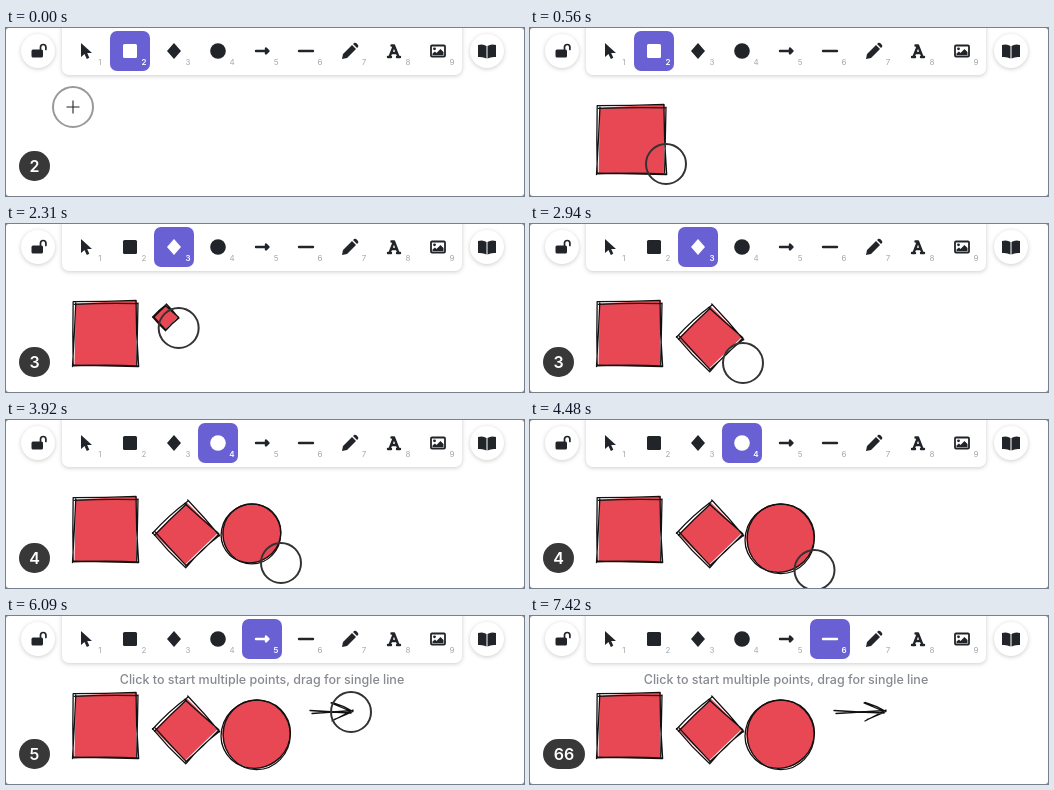
These frames come from a looping animation (518x168 px, 8 s). An HTML page:

```html
<!DOCTYPE html>
<html lang="en">
<head>
<meta charset="utf-8">
<title>Sketching shapes with number keys</title>
<style>
html, body { margin: 0; width: 100%; height: 100%; overflow: hidden; background: #888; }
svg { display: block; width: 518px; height: 168px; background: #fff; border-radius: 3px; }
text { font-family: Inter, "Open Sans", sans-serif; text-anchor: middle; }
.panel { fill: #fff; filter: drop-shadow(0 1px 2px #0003); }
.tool rect.key { fill: none; }
.tool { color: #212529; fill: currentColor; }
.tool text { font-size: 8px; fill: #a5a9ae; }
.tool.on { color: #fff; }
.tool.on rect.key { fill: #6960d4; }
.tool.on text { fill: #fff; font-weight: 600; }
.icon { fill: none; stroke: currentColor; stroke-width: 2.4; stroke-linecap: round; stroke-linejoin: round; }
.ink { fill: none; stroke: #111; stroke-width: 1.3; stroke-linecap: round; }
.ink path, .ink ellipse { vector-effect: non-scaling-stroke; }
.ink .paint { fill: #e84754; stroke: none; }
.select { fill: #fff; stroke: #111; stroke-width: 1.1; }
.hint { font-size: 12.5px; font-weight: 500; fill: #868a90; }
.badge text { font-size: 16px; font-weight: 600; fill: #fff; }
</style>
</head>
<body>
<svg viewBox="0 0 518 168">
  <g id="scene"></g>
  <rect class="panel" x="56" y="-10" width="400" height="57" rx="7"/>
  <circle class="panel" cx="32" cy="23" r="17"/>
  <circle class="panel" cx="481" cy="23" r="17"/>
  <g fill="#212529">
    <rect x="25.500" y="21.500" width="11.500" height="8" rx="1.500"/>
    <path d="M34.500 22V19.200a2.700 2.700 0 0 1 5.400 0V21.500" fill="none" stroke="#212529" stroke-width="1.700" stroke-linecap="round"/>
    <path d="M472 17q5-1.500 8.500 1v12.500q-3.500-2-8.500-1.500zM490 17q-5-1.500-8.500 1v12.500q3.500-2 8.500-1.500z"/>
  </g>
  <g id="tools"></g>
  <g id="overlay"></g>
</svg>
<script>
const LOOP = 8000, TICK = 70;
const $ = id => document.getElementById(id);

const icons = [
  '<path d="M-5-8V6l3.500-3 2.300 5 2.500-1.200L1.200 2H6z"/>',
  '<rect x="-7" y="-7" width="14" height="14" rx="1.500"/>',
  '<path d="M0-8 7 0 0 8-7 0z"/>',
  '<circle r="7.800"/>',
  '<path class="icon" d="M-6 0H5M4-2.500 6.500 0 4 2.500z"/>',
  '<path class="icon" d="M-7 0H7"/>',
  '<path d="M-8 8-7 3 2-6 6-2-3 7zM3-7l1.500-1.200q1-.5 2 .5L8-6q.7 1 0 2L7-3z"/>',
  '<path class="icon" d="M-4.500 6 0-5.500 4.500 6M-3 2H3M-6 6h3M3 6h3M-2.500-5.500H0"/>',
  '<rect class="icon" x="-7" y="-5.500" width="14" height="11" rx="1" style="stroke-width:1.800"/><circle cx="-3.500" cy="-2.200" r="1.400"/><path d="M-5.500 4V2.500L-3 .5-1.500 2 2.500-2 5.500 1V4z"/>'
];
$('tools').innerHTML = icons.map((icon, i) => `<g class="tool" transform="translate(${60 + 44 * i} 3)">
  <rect class="key" width="40" height="40" rx="7"/><g transform="translate(20 20)">${icon}</g>
  <text x="34" y="34">${i + 1}</text></g>`).join('');
const buttons = [...$('tools').children];

// [time, tool number]
const toolTimes = [[0, 2], [1050, 1], [1400, 3], [3010, 1], [3220, 4], [4620, 1], [5110, 5], [6790, 1], [7420, 6]];
// [label, pressed at]
const keys = [['2', -2030], ['3', 1400], ['4', 3220], ['5', 5110], ['66', 7420]];

// Hand-drawn shapes on a 100-unit square
const square = `<path class="paint" d="M5 4 98-1 97 98 3 99z"/>
  <path d="M1 1Q50 1 97-1M3 5Q50 3 100 4M97 0Q97 50 101 100M100 3Q99 50 98 97M101 99Q50 97 1 99M2 98 100 100M5 3Q3 50 0 100M1 1Q0 50 1 98"/>`;
const diamond = `<path class="paint" d="M52 4 98 50 49 97 3 52z"/>
  <path d="M53 0Q78 26 101 54M48 5Q72 27 99 50M0 50Q24 23 54 1M3 53Q25 30 51 6M0 49Q23 77 50 102M4 48Q28 75 50 98M50 99Q75 77 100 51M51 101Q72 75 101 53"/>`;
const disc = `<ellipse class="paint" cx="50" cy="50" rx="49" ry="50"/>
  <ellipse cx="51" cy="51" rx="48.500" ry="50.500"/>
  <ellipse cx="49.500" cy="50" rx="51" ry="48.500" transform="rotate(-35 50 50)"/>`;

// path: [time, x, y] of the pointer; the button is held from down to up
const drags = [
  { art: square, x: 66.5, y: 77, down: 70, up: 1050, off: 1400,
    path: [[0, 67, 79], [70, 67, 79], [420, 136, 136], [560, 136, 136], [770, 132, 133], [910, 132, 133]] },
  { art: diamond, x: 146.5, y: 80, down: 2170, up: 3010, off: 3220,
    path: [[2030, 150, 47], [2170, 148, 82], [2590, 222, 148], [2800, 214, 141], [2870, 213, 139]] },
  { art: disc, x: 215.5, y: 83.5, down: 3500, up: 4620, off: 5110,
    path: [[3500, 215, 85], [3920, 275, 143], [4200, 286, 152], [4340, 286, 152], [4480, 284.5, 150]] },
  { arrow: true, x: 305, y: 95, down: 5950, up: 6790, off: 7420,
    path: [[5950, 304, 96], [6090, 345, 96], [6370, 354, 97]] }
];

function pointAt(path, t) {
  const i = path.findIndex(p => p[0] > t);
  if (i < 0) return path[path.length - 1].slice(1);
  const a = path[i - 1], b = path[i], k = (t - a[0]) / (b[0] - a[0]);
  return [1, 2].map(n => a[n] + (b[n] - a[n]) * k);
}

function drawArrow(x) {
  const tip = x + 2, len = Math.min(21, (tip - 305) / 2), h = len * .43;
  return `<path class="ink" d="M304 94.500Q${(304 + tip) / 2} 96 ${tip - 2} 97M306 97.500 ${tip} 94.500
    M${tip - len} ${95.500 - h}Q${tip - len / 2} ${94 - h / 2} ${tip} 95.500M${tip - len - 1} ${96 - h} ${tip - 3} 95
    M${tip - len} ${96 + h} ${tip} 94M${tip - len + 2} ${94.500 + h} ${tip - 1} 96"/>`;
}

function selection(x, y, w, h, isLine) {
  const spots = [];
  for (const i of [0, .5, 1]) for (const j of [0, .5, 1])
    if (isLine ? i === j && i !== .5 : i !== .5 || j !== .5)
      spots.push([x - 7 + i * (w + 13.5), y - 7 + j * (h + 13.5)]);
  return `<g class="select"><rect x="${x - 3}" y="${y - 3}" width="${w + 5}" height="${h + 5}" fill="none" stroke-dasharray="7 3"/>
    ${spots.map(([a, b]) => `<rect x="${a - 4}" y="${b - 4}" width="8" height="8"/>`).join('')}
    ${isLine ? '' : `<circle cx="${x + w / 2}" cy="${y - 23}" r="4"/>`}</g>`;
}

function drawDrag(d, t) {
  if (t < d.down) return '';
  const [x, y] = pointAt(d.path, t), size = Math.max(x - d.x, y - d.y);
  if (size < 2) return '';
  const selected = t >= d.up && t < d.off;
  if (d.arrow) return drawArrow(x) + (selected ? selection(305, 87, 51, 16, true) : '');
  return `<g class="ink" transform="translate(${d.x} ${d.y}) scale(${size / 100})">${d.art}</g>`
    + (selected ? selection(d.x, d.y, size, size) : '');
}

function drawPointer(d, t) {
  const fade = t < d.up ? 1 : 1 - (t - d.up + TICK) / 210;
  if (t < d.path[0][0] || fade <= 0) return '';
  const [x, y] = pointAt(d.path, t), held = t >= d.down && t < d.up;
  return `<g transform="translate(${x} ${y})" fill="none" opacity="${fade}">
    <circle r="20" stroke="${held ? '#333' : '#999'}" stroke-width="2"/>
    ${t < d.down ? '<path d="M-6.500 0h13M0-6.500v13" stroke="#222" stroke-width="1.100"/>' : ''}</g>`;
}

function drawBadge([label, born], t) {
  const age = t - born, fade = Math.min(1, 1 - (age - 2030) / 210);
  if (age < 0 || fade <= 0) return '';
  const newer = keys.some(k => k[1] > born && k[1] <= t);
  const w = label.length > 1 ? 42 : 31;
  return `<g class="badge" transform="translate(13 ${newer ? 83 : 123})" opacity="${fade}">
    <rect width="${w}" height="30" rx="15" fill="#383838"/><text x="${w / 2}" y="21">${label}</text></g>`;
}

function drawHint(tool, t) {
  const label = tool > 4 ? 'Click to start multiple points, drag for single line'
    : tool === 1 && t < 6790 ? 'Press Enter to add text' : '';
  if (!label) return '';
  const back = tool > 4 ? '<rect x="106" y="53" width="300" height="21" fill="#fff"/>' : '';
  return `${back}<text class="hint" x="256" y="68">${label}</text>`;
}

function frame(now) {
  const t = Math.floor(now % LOOP / TICK) * TICK;
  const tool = toolTimes.filter(s => s[0] <= t).pop()[1];
  buttons.forEach((b, i) => b.classList.toggle('on', i + 1 === tool));
  const halo = t >= 5110 && t < 5600 ? '<circle cx="250.500" cy="119" r="50" fill="#f2f2f2"/>' : '';
  $('scene').innerHTML = halo + drags.map(d => drawDrag(d, t)).join('');
  $('overlay').innerHTML = drawHint(tool, t) + drags.map(d => drawPointer(d, t)).join('')
    + keys.map(k => drawBadge(k, t)).join('');
}

const start = performance.now();
function loop() {
  frame(performance.now() - start);
  requestAnimationFrame(loop);
}
loop();
</script>
</body>
</html>
```
